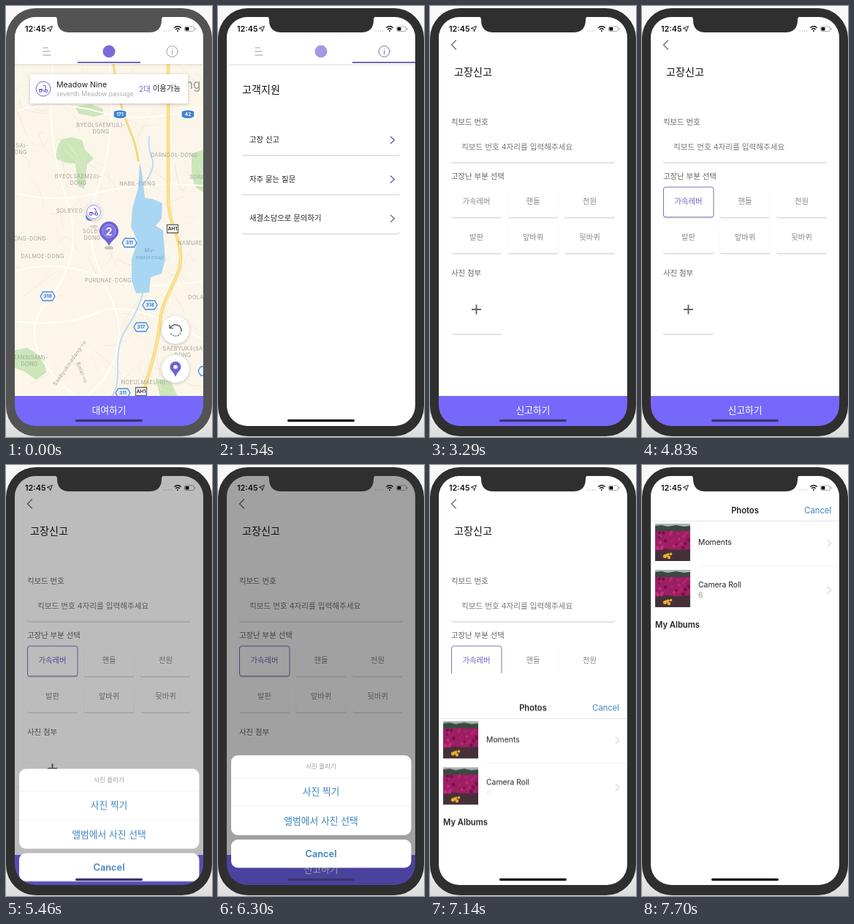
These frames come from a looping animation (282x588 px, 8 s). An HTML page:

```html
<!DOCTYPE html>
<html lang="ko">
<head>
<meta charset="utf-8">
<title>Scooter rental app</title>
<style>
html, body { margin: 0; width: 100%; height: 100%; overflow: hidden; background: #f6f6f6; }
svg { display: block; }
#stage { width: 282px; height: 588px; font-family: Inter, "Noto Sans CJK KR", "Noto Sans CJK", sans-serif; --purple: #7668fa; }
text { dominant-baseline: central; font-size: 10.4px; fill: #222; }
.mid { text-anchor: middle; }
.title { font-size: 14.1px; fill: #111; }
.label { fill: #666; }
.option { fill: #888; }
.bar { fill: var(--purple); }
.cta { font-size: 12.8px; fill: #fff; text-anchor: middle; }
.blue { fill: #3c84c0; }
.action { font-size: 12.8px; text-anchor: middle; }
.bold { font-weight: 600; }
.head { font-size: 11.2px; }
.line { fill: none; stroke-linecap: round; stroke-linejoin: round; }
.card { fill: #fff; filter: drop-shadow(0 2px .7px rgba(0,0,0,.11)); }
.float { fill: #fff; filter: drop-shadow(0 1px 2px rgba(0,0,0,.22)); }
.place { font-size: 7.2px; fill: #a3a19d; letter-spacing: .4px; text-anchor: middle; }
.lake { fill: #6da5c9; font-style: italic; }
.sign { font-size: 6.5px; font-weight: 700; text-anchor: middle; }

.bezel, .track, .mark, .indicator, .info, .home, .press, .report, .chosen, .chosenText, .dim, .sheet, .picker, .count, .grip {
  animation: 8s linear infinite;
}
.bezel { animation-name: bezel; animation-timing-function: step-end; }
@keyframes bezel { 0% { fill: #535353; } 11.375%, 100% { fill: #2f2f2f; } }
.grip { animation-name: grip; animation-timing-function: step-end; }
@keyframes grip { 0% { fill: #3a3470; } 9% { fill: #0a0a0a; } 33.5% { fill: #3a3470; } 88%, 100% { fill: #0a0a0a; } }

.track { animation-name: track; }
@keyframes track {
  0%, .625% { transform: none; animation-timing-function: cubic-bezier(.3,.2,.3,1); }
  16.625%, 100% { transform: translateX(-258px); }
}
.indicator { animation-name: indicator; }
@keyframes indicator {
  0%, .625% { transform: none; animation-timing-function: cubic-bezier(.3,.2,.3,1); }
  16.625%, 100% { transform: translateX(86px); }
}
.mark { animation-name: mark; }
@keyframes mark { 0%, .625% { opacity: 1; } 16.625%, 100% { opacity: .7; } }
.info { animation-name: info; animation-timing-function: step-end; }
@keyframes info { 0% { stroke: #9b9b9b; } 18.375%, 100% { stroke: #746cac; } }

.press { animation-name: press; animation-timing-function: step-end; }
@keyframes press { 0% { opacity: 1; } 31.5%, 100% { opacity: .6; } }
.home { animation-name: home; }
@keyframes home {
  0%, 32.81% { transform: none; animation-timing-function: cubic-bezier(.2833,.99,.31833,.99); }
  40.44%, 100% { transform: translateX(-77px); }
}
.report { animation-name: report; }
@keyframes report {
  0%, 32.81% { transform: translateX(266px); animation-timing-function: cubic-bezier(.2833,.99,.31833,.99); }
  40.44%, 100% { transform: none; }
}
.chosen { animation-name: chosen; }
@keyframes chosen { 0%, 51.19% { opacity: 0; } 54.69%, 100% { opacity: 1; } }
.chosenText { animation-name: chosenText; }
@keyframes chosenText { 0%, 51.19% { fill: #888; } 54.69%, 100% { fill: #6f64c4; } }

.dim { animation-name: dim; }
@keyframes dim { 0%, 65.19% { opacity: 0; } 69.5%, 79.25% { opacity: .37; } 84%, 100% { opacity: 0; } }
.sheet { animation-name: sheet; }
@keyframes sheet {
  0%, 65.19% { transform: translateY(190px); animation-timing-function: cubic-bezier(.3,.7,.3,1); }
  71.25%, 79.25% { transform: none; animation-timing-function: cubic-bezier(.4,.1,.4,1); }
  84%, 100% { transform: translateY(190px); }
}
.picker { animation-name: picker; }
@keyframes picker {
  0%, 87.79% { transform: translateY(559px); animation-timing-function: cubic-bezier(.3,.7,.3,1); }
  94.7%, 100% { transform: none; }
}
.count { animation-name: count; }
@keyframes count { 0%, 89.25% { fill: #eee; } 91.5%, 100% { fill: #999; } }
</style>
</head>
<body>
<svg id="stage" viewBox="0 0 282 588">
  <defs>
    <clipPath id="screen"><rect x="11" y="14" width="260" height="560" rx="14"/></clipPath>
    <clipPath id="mapArea"><rect x="12" y="79" width="258" height="453"/></clipPath>
    <clipPath id="thumbArea"><rect width="48" height="51"/></clipPath>
    <linearGradient id="edge"><stop offset="0" stop-opacity="0"/><stop offset="1" stop-opacity=".2"/></linearGradient>
    <linearGradient id="backdrop" x2="0" y2="1"><stop offset=".9" stop-color="#f8f8f8"/><stop offset="1" stop-color="#dcdcdc"/></linearGradient>
    <path id="next" class="line" d="M-2.5-4.5L2.5 0L-2.5 4.5"/>
    <g id="scooter" class="line" stroke="#7164d8" stroke-width="1.2">
      <path d="M-5.5 .5h4l1.500 2.500h2.200L3.500-1.500 2-4.500H.3"/><circle cx="-3.800" cy="2.800" r="1.700"/><circle cx="4" cy="2.800" r="1.700"/>
    </g>
    <g id="thumb" clip-path="url(#thumbArea)">
      <rect width="48" height="51" fill="#9c1f63"/>
      <rect width="48" height="5" fill="#a9b5b3"/>
      <path d="M0 3l9-1 8 2 12-2 10 2 9-1v7H0z" fill="#3a4a40"/>
      <path d="M0 37l12-3 14 2 22-1v16H0z" fill="#45303a"/>
      <g id="petals"></g>
    </g>
  </defs>

  <rect width="282" height="588" fill="url(#backdrop)"/>

  <g clip-path="url(#screen)">
    <rect x="11" y="14" width="260" height="560" fill="#fff"/>

    <g class="home">
      <g class="track">
        <g clip-path="url(#mapArea)">
          <rect x="12" y="79" width="258" height="453" fill="#fcf6ea"/>
          <g fill="#cbe6b8">
            <path d="M76 182l14-3 14 4 4 13 12 12-9 8-4 34-9-5-3-30-13-1-15-6 4-17z"/>
            <path d="M94 137l22-3 16 6 2 8-14 3-20-4z"/>
            <path d="M254 202l16-6v58l-10-6-6-16z"/>
            <path d="M12 470l16-4 12 7 12 9 3 18-14 10-15-11-14-5z"/>
            <path d="M205 508l20 4 10 20h-24z"/>
          </g>
          <g id="streets" class="line" stroke="#f0e7d6"></g>
          <g class="line" stroke="#fffdf8" stroke-width="2">
            <path d="M12 143Q70 128 130 145T270 137M12 255Q70 270 126 255T270 245M12 362Q70 345 125 368T270 375"/>
            <path d="M64 79Q54 180 82 260T58 400 95 532M142 79Q150 190 125 250T140 390 112 532M12 430Q85 438 125 418T270 455"/>
          </g>
          <path class="line" stroke="#b4dbf3" stroke-width="1.8" d="M196 178q-2 15 4 30t-17 42M188 390q-8 28-22 48t-13 52 -8 42"/>
          <path fill="#a9d6f2" d="M183 213l4 20 3 29 10 1 14 6-1 21-8 10 10 6 3 39-5 20-15 5-2 21-18 1-6-17v-30l8-24-9-20 2-25 8-28z"/>
          <g class="line">
            <path stroke="#ecc556" stroke-width="2.800" d="M147 79Q155 135 167 163T181 211"/>
            <path stroke="#fbe08a" stroke-width="1.800" d="M147 79Q155 135 167 163T181 211"/>
            <path stroke="#f2d27a" stroke-width="4.600" d="M222 75V262C222 298 240 315 239 345S214 395 211 430 198 490 186 536"/>
            <path stroke="#fce18b" stroke-width="3.400" d="M222 75V262C222 298 240 315 239 345S214 395 211 430 198 490 186 536"/>
          </g>
          <g id="places"></g>
          <text x="246" y="107" style="font-size:17px;fill:#999">ng</text>
          <text class="place lake" x="197" y="333">Mir-</text>
          <text class="place lake" x="197" y="342">naejeosuji</text>
          <text class="place" transform="translate(87 487)rotate(-55)">Saebyukmadang-ro</text>
          <text class="place" transform="translate(104 500)rotate(68)">Binal-ro</text>
          <g id="signs"></g>

          <ellipse cx="120" cy="301" rx="6" ry="2.200" fill="#0002"/>
          <circle cx="115" cy="287" r="6" fill="#4a8fe0"/>
          <circle class="float" cx="120" cy="281" r="11"/>
          <circle cx="120" cy="281" r="9.500" fill="none" stroke="#7164d8" stroke-width=".8"/>
          <use href="#scooter" x="120" y="281"/>
          <ellipse cx="141" cy="330" rx="6.500" ry="2.500" fill="#0003"/>
          <path fill="#6e60d6" d="M141 327Q137 320 132 316.500A13 13 0 1 1 150 316.500Q145 320 141 327z"/>
          <circle cx="141" cy="307" r="9" fill="#7f72e2" stroke="#a9a0f0"/>
          <text class="mid bold" x="141" y="307.500" style="font-size:15px;fill:#fff">2</text>

          <circle class="float" cx="232" cy="442" r="19"/>
          <path class="line" stroke="#444" stroke-width="1.200" d="M225 439A8 8 0 0 1 240 443"/>
          <path class="line" stroke="#444" stroke-width="1.200" stroke-dasharray="1 2.500" d="M240 443A8 8 0 0 1 225 446"/>
          <path class="line" stroke="#444" stroke-width="1.200" d="M224 435v4.500h4.500"/>
          <circle class="float" cx="232" cy="495" r="19"/>
          <path fill="#6e60d6" d="M232 506q-2-5-5-8a7.500 7.500 0 1 1 10 0q-3 3-5 8z"/><circle cx="232" cy="492.500" r="2.800" fill="#fff"/>
        </g>
        <rect class="float" x="33" y="93" width="216" height="40" rx="2"/>
        <circle cx="51" cy="113" r="10" fill="#fff" stroke="#7164d8"/>
        <use href="#scooter" x="51" y="113"/>
        <text x="69" y="107" style="font-size:10.600px">Meadow Nine</text>
        <text x="69" y="120" style="font-size:8.700px;font-weight:300;fill:#999">seventh Meadow passage</text>
        <text x="239" y="112.500" text-anchor="end"><tspan fill="#7668d8">2대</tspan> 이용가능</text>
        <rect class="bar" x="12" y="532" width="258" height="42"/>
        <text class="cta" x="141" y="551.500">대여하기</text>

        <g transform="translate(258)">
          <rect x="12" y="79" width="258" height="495" fill="#fff"/>
          <text class="title" x="33" y="113.300">고객지원</text>
          <g id="support"></g>
        </g>
      </g>
      <rect x="12" y="79" width="258" height="2.500" fill="#0001"/>
      <rect x="11" y="14" width="260" height="65" fill="#fff"/>
      <path class="line" stroke="#999" stroke-width="1.200" d="M51 57h6M51 62h9M51 67h10"/>
      <circle class="mark" cx="141" cy="62" r="8.500" fill="#7a6cda"/>
      <g class="info line" stroke="#9b9b9b"><circle cx="227.500" cy="62" r="7.500"/><path d="M227.500 61v4.500M227.500 58v.2"/></g>
      <rect class="indicator" x="98" y="76" width="86" height="2" fill="#7268b8"/>
    </g>

    <g class="report">
      <rect x="7" y="15" width="5" height="559" fill="url(#edge)"/>
      <rect x="12" y="14" width="259" height="560" fill="#fff"/>
      <path class="line" stroke="#666" stroke-width="1.200" d="M35.500 47l-6 6 6 6"/>
      <text class="title" x="33" y="89.200">고장신고</text>
      <text class="label" x="29" y="158.700">킥보드 번호</text>
      <rect class="card" x="29" y="173" width="224" height="40" rx="3"/>
      <text x="43" y="192" style="font-size:10.600px;fill:#777">킥보드 번호 4자리를 입력해주세요</text>
      <text class="label" x="29" y="232.700">고장난 부분 선택</text>
      <g id="options"></g>
      <rect class="chosen" x="29.500" y="247" width="68.500" height="41" rx="3" fill="none" stroke="#7c72b8"/>
      <text class="label" x="29" y="364">사진 첨부</text>
      <rect class="card" x="29" y="379" width="69" height="68" rx="3"/>
      <path stroke="#666" stroke-width="2" d="M57 414h13M63.500 407.500v13"/>
      <rect class="bar" x="12" y="532" width="258" height="42"/>
      <text class="cta" x="141" y="551.500">신고하기</text>
    </g>

    <rect class="dim" x="11" y="14" width="260" height="560"/>
    <g class="sheet">
      <rect x="18" y="396" width="246.500" height="109" rx="9" fill="#fff"/>
      <path stroke="#ececec" stroke-width=".7" d="M18 426.500h246M18 465.500h246"/>
      <text class="mid" x="141" y="411.200" style="font-size:8.500px;fill:#999">사진 올리기</text>
      <text class="action blue" x="141" y="445.500">사진 찍기</text>
      <text class="action blue" x="141" y="485">앨범에서 사진 선택</text>
      <rect x="18" y="511" width="246.500" height="38.500" rx="9" fill="#fff"/>
      <text class="action blue bold" x="141" y="530.500">Cancel</text>
    </g>

    <g class="picker">
      <rect x="11" y="15" width="260" height="560" fill="#fff"/>
      <text class="mid bold head" x="141" y="61.500">Photos</text>
      <text class="blue head" x="259" y="61.500" text-anchor="end">Cancel</text>
      <path stroke="#dedede" stroke-width=".8" d="M12 76.500h258"/>
      <path stroke="#ececec" stroke-width=".7" d="M77 137.500h193"/>
      <use href="#thumb" x="18" y="80"/>
      <use href="#thumb" x="18" y="143"/>
      <text x="77" y="105.500">Moments</text>
      <text x="77" y="163.500">Camera Roll</text>
      <text class="count" x="77" y="177.500">6</text>
      <use href="#next" x="256.500" y="106.500" stroke="#c4c4c4"/>
      <use href="#next" x="256.500" y="170.500" stroke="#c4c4c4"/>
      <text class="bold head" x="18" y="217.500">My Albums</text>
    </g>
  </g>

  <g class="bezel" fill="#2f2f2f">
    <path fill-rule="evenodd" d="M41 3H241a41 41 0 0 1 41 41V546a41 41 0 0 1-41 41H41a41 41 0 0 1-41-41V44a41 41 0 0 1 41-41z
      M40 15a28 28 0 0 0-28 28V545a28 28 0 0 0 28 28H242a28 28 0 0 0 28-28V43a28 28 0 0 0-28-28z"/>
    <path d="M65 14q5 0 5 5 0 17 17 17H196q17 0 17-17 0-5 5-5z"/>
  </g>
  <text class="bold" x="26" y="31" style="font-size:10.800px;fill:#111">12:45</text>
  <path d="M63.500 27.500l-3 7.500-.8-3.700-3.700-.8z" fill="none" stroke="#222"/>
  <path class="line" stroke="#0004" stroke-width="1.600" stroke-dasharray="0 3.300" d="M216 34h11"/>
  <g class="line" stroke="#111" stroke-width="1.500" style="stroke-linecap:butt"><path d="M230.300 29.800q4.700-4 9.400 0M232.200 32q2.800-2.400 5.600 0"/><path d="M234 34h2"/></g>
  <rect x="244.500" y="28" width="13" height="6.500" rx="2" fill="none" stroke="#0006" stroke-width=".8"/>
  <rect x="245.500" y="29" width="5" height="4.500" rx="1" fill="#111"/>
  <path stroke="#0006" d="M259 30v2.500"/>
  <rect class="grip" x="95" y="564" width="92" height="3.200" rx="1.600"/>
</svg>

<script>
const fill = (id, items, draw) => {
  document.getElementById(id).innerHTML = items.map(draw).join('');
};
let seed = 7;
const random = (low, high) => {
  seed = (seed * 16807) % 2147483647;
  return +(low + (high - low) * seed / 2147483647).toFixed(1);
};

fill('streets', Array(90).fill(), () =>
  `<path stroke-width="${random(.5, 1)}" d="M${random(10, 270)} ${random(80, 530)}q${random(-25, 25)} ${random(-25, 25)} ${random(-45, 45)} ${random(-45, 45)}"/>`);

fill('places', [
  ['BYEOLSAEM1(IL)-', 130, 162], ['DONG', 130, 171],
  ['BYEOLSAEM2(I)-', 99, 232], ['DONG', 99, 241],
  ['SA)-', 22, 190], ['ONG', 20, 199],
  ['DARNGOL-DONG', 230, 203], ['NABIL-DONG', 180, 242],
  ['SOLBYEO', 87, 279], ['SOLBY', 118, 307], ['DONG', 118, 316],
  ['ONG-DONG', 33, 317], ['DALMOE-DONG', 50, 341], ['PURUNAE-DONG', 140, 374],
  ['NAMURE', 252, 323], ['DOLA', 260, 397], ['SORA', 262, 233],
  ['SAEBYUK4(SA', 242, 467], ['DONG', 242, 476],
  ['TAN3(SAM)-', 34, 479], ['DONG', 32, 488], ['NOEULMAEU-RI', 188, 513]
], ([name, x, y]) => `<text class="place" x="${x}" y="${y}">${name}</text>`);

const signs = {
  road: ['M-9-4.500q9-4 18 0v8q-9 5-18 0z', '#4383d0', '#fff', '#fff'],
  hex: ['M-10 0l3.500-6h13l3.500 6-3.500 6h-13z', '#e9f2fc', '#4f8ccf', '#3873b8'],
  asia: ['M-7.500-5.500h15v11h-15z', '#fff', '#666', '#333']
};
fill('signs', [
  ['road', 171, 156, 148], ['road', 42, 249, 148],
  ['hex', 311, 169, 323], ['hex', 318, 57, 396], ['hex', 318, 197, 408],
  ['hex', 317, 185, 438], ['hex', 311, 160, 528], ['hex', '', 273, 498],
  ['asia', 'AH1', 228, 304], ['asia', 'AH1', 185, 526]
], ([kind, label, x, y]) => {
  const [shape, back, rim, ink] = signs[kind];
  return `<g transform="translate(${x} ${y})"><path d="${shape}" fill="${back}" stroke="${rim}" stroke-width="1.3"/>
    <text class="sign" y=".3" style="fill:${ink}">${label}</text></g>`;
});

fill('support', ['고장 신고', '자주 묻는 질문', '새결소담으로 문의하기'], (label, i) => {
  const y = 183 + i * 53.5;
  return `<rect class="card" x="33" y="${y - 20}" width="216" height="40" rx="3"/>
    <g class="${i ? '' : 'press'}"><text x="43" y="${y - .4}">${label}</text>
    <use href="#next" x="239" y="${y}" stroke="${i < 2 ? '#6a61a8' : '#777'}" stroke-width="1.5"/></g>`;
});

fill('options', ['가속레버', '핸들', '전원', '발판', '앞바퀴', '뒷바퀴'], (label, i) => {
  const x = 29 + (i % 3) * 77.5, y = i < 3 ? 247 : 296;
  return `<rect class="card" x="${x}" y="${y}" width="69" height="41" rx="3"/>
    <text class="mid option ${i ? '' : 'chosenText'}" x="${x + 34.5}" y="${y + 19.6}">${label}</text>`;
});

fill('petals', Array(32).fill(), (_, i) => {
  const low = i > 26;
  const color = low ? '#e8b02c' : ['#c42a80', '#741048', '#b8246f'][i % 3];
  return `<circle cx="${low ? random(6, 24) : random(2, 46)}" cy="${low ? random(40, 48) : random(11, 35)}" r="${random(1.5, 2.6)}" fill="${color}"/>`;
});
</script>
</body>
</html>
```
